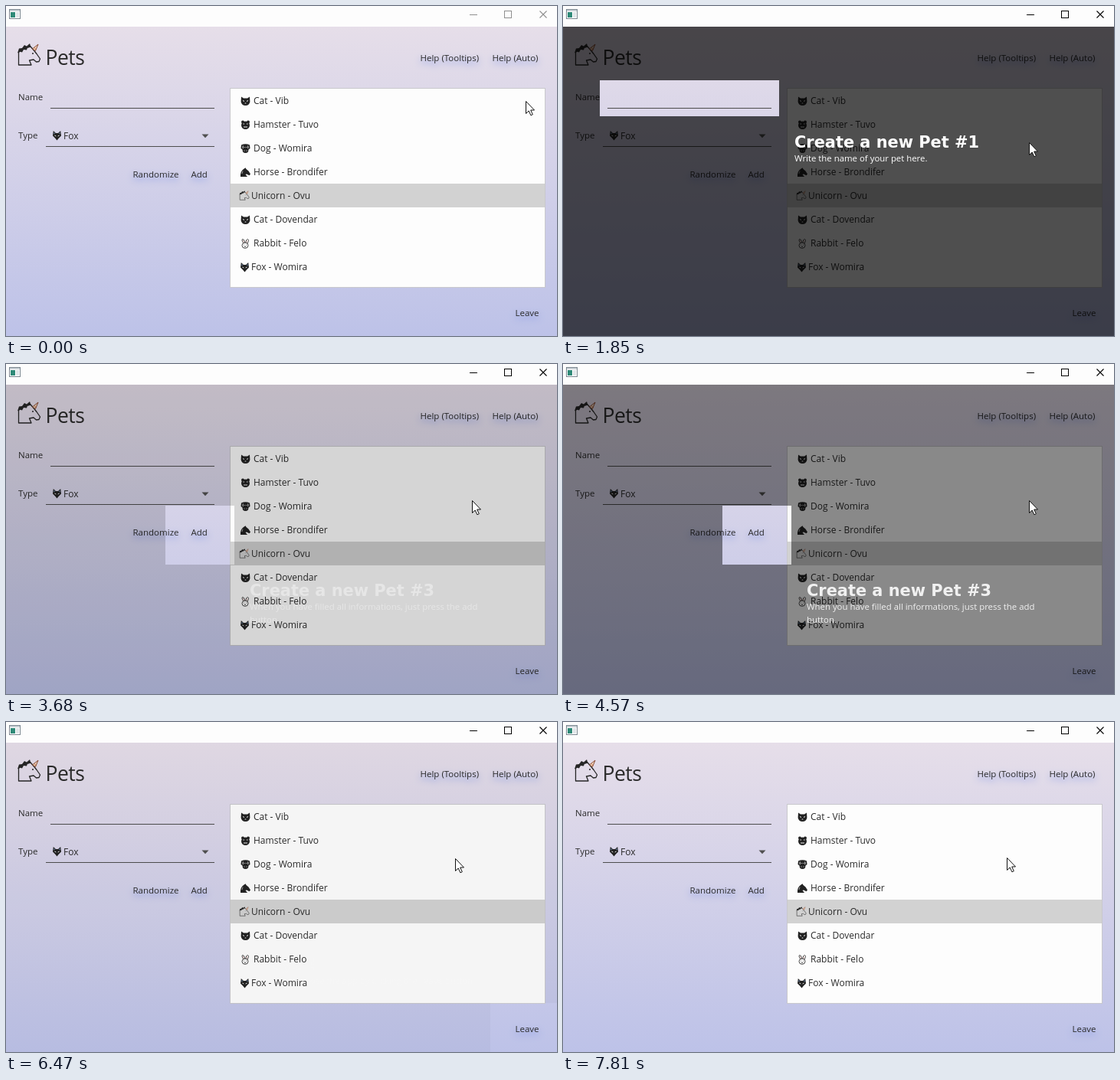
An HTML page for the animation above (7990 ms loop, 719 by 431 pixels).

```html
<!DOCTYPE html>
<html lang="en">
<head>
<meta charset="utf-8">
<title>Pets</title>
<style>
  html, body { margin: 0; width: 100%; height: 100%; overflow: hidden; background: #fff; }
  svg { display: block; width: 719px; height: 431px; }
  text { font: 11.5px "Open Sans", "Noto Sans", sans-serif; fill: #2b2b2b; white-space: pre; }
  .list text, .list-text { font-size: 12px; }
  .heading { font-size: 26.5px; letter-spacing: -.5px; }
  .button { filter: drop-shadow(0 4px 4px #7d95e6); }
  .tip text { fill: #fff; font-size: 11.4px; }
  .tip .title { font: bold 20.9px "DejaVu Sans", Verdana, sans-serif; }
</style>
</head>
<body>
<svg viewBox="0 0 719 431" xmlns="http://www.w3.org/2000/svg">
  <defs>
    <linearGradient id="sky" x1="0" y1="0" x2="0" y2="1">
      <stop offset="0" stop-color="#e6dee9"/>
      <stop offset="1" stop-color="#bdc2e8"/>
    </linearGradient>

    <g id="cat">
      <path d="M1 0.5L4 2.6H9L12 .5L12.4 7Q11.500 12 6.500 12T.6 7Z" fill="#222"/>
      <path d="M3 5.500L5 6.500M10 5.500L8 6.500M5.700 9H7.300" stroke="#eee" fill="none"/>
    </g>
    <g id="hamster">
      <circle cx="3" cy="2.500" r="2" fill="#222"/>
      <circle cx="10" cy="2.500" r="2" fill="#222"/>
      <ellipse cx="6.500" cy="6.700" rx="5.500" ry="5.200" fill="#222"/>
      <path d="M3.500 5H5M8 5H9.500M4 9H9" stroke="#eee" fill="none"/>
    </g>
    <g id="dog">
      <path d="M1 1.500Q6.500 -.8 12 1.500L12.500 6L10.500 7.500L10 10.500Q6.500 13.500 3 10.500L2.500 7.500L.5 6Z" fill="#222"/>
      <path d="M3.200 2.500V6M9.800 2.500V6M5 4.500H5.800M7.200 4.500H8M4.500 9H5.500M7.500 9H8.500" stroke="#eee" fill="none"/>
    </g>
    <g id="horse">
      <path d="M0 12Q-.5 5 4 2L6.500 .2L7.500 2L10.500 4.500L13 8.500L11.500 10.300L8 8.500L6.500 9L9 12Z" fill="#222"/>
      <path d="M3 4.500L2 8" stroke="#eee" stroke-width=".6"/>
    </g>
    <g id="rabbit" fill="#fff" stroke="#333" stroke-width=".9">
      <path d="M4 6Q.8 1 2.800 .5T5.800 5.500M6.800 5.500Q7.500 0 9.600 .7T8.800 6.500"/>
      <ellipse cx="6" cy="8.700" rx="4" ry="3.700"/>
      <path d="M4 8H4.800M7.200 8H8M5 10.300H7" fill="none"/>
      <path d="M3.300 2L4.500 5M8.700 2L8 5" stroke="#e5a9a4" stroke-width=".6"/>
    </g>
    <g id="fox">
      <path d="M.8 0L4 3H7L10.200 0L11 6.500L8 9.500L5.500 12.500L3 9.500L0 6.500Z" fill="#222"/>
      <path d="M2 2.500V4M9 2.500V4" stroke="#7fa6d6"/>
      <path d="M2.500 6L4.300 7M8.500 6L6.700 7" stroke="#eee"/>
    </g>
    <g id="unicorn" stroke-linejoin="round">
      <path d="M1.500 28.500V12L7 7L17 4.500L21 9L25 14L29.500 20.500L28 24L24.500 24.500L21 21.500L15.500 22.500L18 28.500Z"
        fill="none" stroke="#262626" stroke-width="1.300"/>
      <path d="M0 13L2 7L6 6.500L9 2.500L12 4L16 .5L17.500 5L13 6L12 9L8 8.500L6 12L3 11Z" fill="#262626"/>
      <path d="M19.500 7.500L27 1.500L23.500 10Z" fill="#f3dcc6" stroke="#8a4a32" stroke-width="1"/>
      <path d="M22 6L24 8.500" stroke="#c96f3f"/>
      <circle cx="20" cy="13.500" r="1" fill="#262626"/>
    </g>
  </defs>

  <rect width="719" height="27" fill="#fdfdfd"/>
  <g shape-rendering="crispEdges">
    <rect x="4.500" y="4.500" width="14" height="12" fill="#fff" stroke="#7b8790"/>
    <rect x="5" y="5" width="13" height="2" fill="#c9d0d5"/>
    <rect x="6" y="8" width="6" height="7" fill="#2f8a78"/>
    <rect x="13" y="8" width="4" height="7" fill="#dfe5e8"/>
  </g>
  <g id="controls" fill="none">
    <path d="M605 11.500H615M650.500 6.500H659.500V15.500H650.500Z" shape-rendering="crispEdges"/>
    <path d="M696.500 6.500L705.500 15.500M705.500 6.500L696.500 15.500" stroke-width="1.100"/>
  </g>

  <rect y="27" width="719" height="404" fill="url(#sky)"/>
  <use href="#unicorn" x="15" y="48.500"/>
  <text class="heading" x="51.500" y="77">Pets</text>
  <text x="16" y="123">Name</text>
  <text x="16" y="173">Type</text>
  <path d="M58 133.500H272M52 183.500H272" stroke="#4d4d4d" shape-rendering="crispEdges"/>
  <use href="#fox" x="61" y="163"/>
  <text class="list-text" x="75" y="174">Fox</text>
  <path d="M255.500 167.500H264.500L260 172.300Z" fill="#505050"/>
  <text class="button" x="540.500" y="72">Help (Tooltips)</text>
  <text class="button" x="634.500" y="72">Help (Auto)</text>
  <text class="button" x="165.500" y="224">Randomize</text>
  <text class="button" x="241.500" y="224">Add</text>
  <text class="button" x="664.500" y="405">Leave</text>

  <rect x="292.500" y="107.500" width="411" height="260" fill="#fdfdfd" stroke="#c8c8cc" shape-rendering="crispEdges"/>
  <rect x="293" y="232" width="410" height="31" fill="#d2d2d2"/>
  <g class="list" id="list"></g>

  <path id="shade" fill="#000" fill-opacity=".7" fill-rule="evenodd"/>
  <g class="tip" id="tip"></g>
  <path id="cursor" d="M.5 .5V16.500L4.200 13L6.900 18.800L9.300 17.700L6.700 12H11.500Z" fill="#fff" stroke="#111" stroke-linejoin="round"/>
</svg>

<script>
const LOOP = 7990;
const $ = id => document.getElementById(id);

function add(parent, tag, attrs, content) {
  const el = document.createElementNS('http://www.w3.org/2000/svg', tag);
  for (const key in attrs) el.setAttribute(key, attrs[key]);
  if (content) el.textContent = content;
  parent.append(el);
}

const pets = [
  ['Cat', 'Vib'], ['Hamster', 'Tuvo'], ['Dog', 'Womira'], ['Horse', 'Brondifer'],
  ['Unicorn', 'Ovu'], ['Cat', 'Dovendar'], ['Rabbit', 'Felo'], ['Fox', 'Womira']
];
pets.forEach(([kind, name], i) => {
  const y = 118 + 31 * i;
  const slim = kind === 'Unicorn' || kind === 'Fox';
  const place = kind === 'Unicorn' ? `translate(304.5 ${y - 1}) scale(.43)` : `translate(306 ${y})`;
  add($('list'), 'use', { href: '#' + kind.toLowerCase(), transform: place });
  add($('list'), 'text', { x: slim ? 320 : 323, y: y + 10 }, `${kind} - ${name}`);
});

// hole: left, top, right, bottom; at: text origin
const steps = [
  { hole: [48, 97, 282, 144], at: [302, 185], title: 'Create a new Pet #1',
    lines: ['Write the name of your pet here.'] },
  { hole: [42, 147, 282, 194], at: [302, 235], title: 'Create a new Pet #2',
    lines: ['Select the type of your pet.'] },
  { hole: [208, 185, 298, 262], at: [318, 303], title: 'Create a new Pet #3',
    lines: ['When you have filled all informations, just press the add', 'button.'] },
  { hole: [282, 97, 714, 378], at: [6, 58], title: 'View all Pet',
    lines: ['After adding a pet, he will appear here, with all his', 'friends'] },
  { hole: [632, 367, 719, 431], at: [344, 324], title: 'Bye !',
    lines: ['You can close the app by clicking the Leave button'] }
];
const starts = [870, 2290, 3560, 4890, 6420];
const ends = [1820, 3090, 4420, 5950, 7150];
const FADE_IN = 430, FADE_OUT = 400;

// time, x, y
const moves = [
  [0, 678, 124], [560, 669, 67], [1060, 669, 67], [1560, 608, 178],
  [4560, 608, 178], [5060, 586, 178], [7300, 586, 178], [7800, 579, 177]
];

const clamp = v => Math.max(0, Math.min(1, v));

function easeBoth(v) {
  const t = clamp(v);
  if (t < .2) return 3.125 * t * t;
  if (t > .8) return 1 - 3.125 * (1 - t) * (1 - t);
  return 1.25 * t - .125;
}

function cursorAt(t) {
  let i = 0;
  while (i < moves.length - 2 && t >= moves[i + 1][0]) i++;
  const [t0, x0, y0] = moves[i], [t1, x1, y1] = moves[i + 1];
  const k = easeBoth((t - t0) / (t1 - t0));
  return [Math.round(x0 + (x1 - x0) * k), Math.round(y0 + (y1 - y0) * k)];
}

let shown = -1;
function showStep(i) {
  if (i === shown) return;
  shown = i;
  const { hole: [l, t, r, b], at: [x, y], title, lines } = steps[i];
  $('shade').setAttribute('d', `M0 27H719V431H0ZM${l} ${t}H${r}V${b}H${l}Z`);
  $('tip').replaceChildren();
  add($('tip'), 'text', { class: 'title', x, y }, title);
  lines.forEach((line, n) => add($('tip'), 'text', { x, y: y + 18 + 17 * n }, line));
}

function draw(t) {
  let i = 0;
  while (i < steps.length - 1 && t >= starts[i + 1]) i++;
  showStep(i);
  const fade = easeBoth((t - starts[i]) / FADE_IN) * (1 - easeBoth((t - ends[i]) / FADE_OUT));
  $('shade').setAttribute('opacity', fade);
  $('tip').setAttribute('opacity', 1 - (1 - fade) ** 2);
  $('controls').setAttribute('stroke', t < 880 ? '#8f8f8f' : '#000');
  $('cursor').setAttribute('transform', `translate(${cursorAt(t)})`);
}

function tick() {
  draw(performance.now() % LOOP);
  requestAnimationFrame(tick);
}
tick();
</script>
</body>
</html>
```
